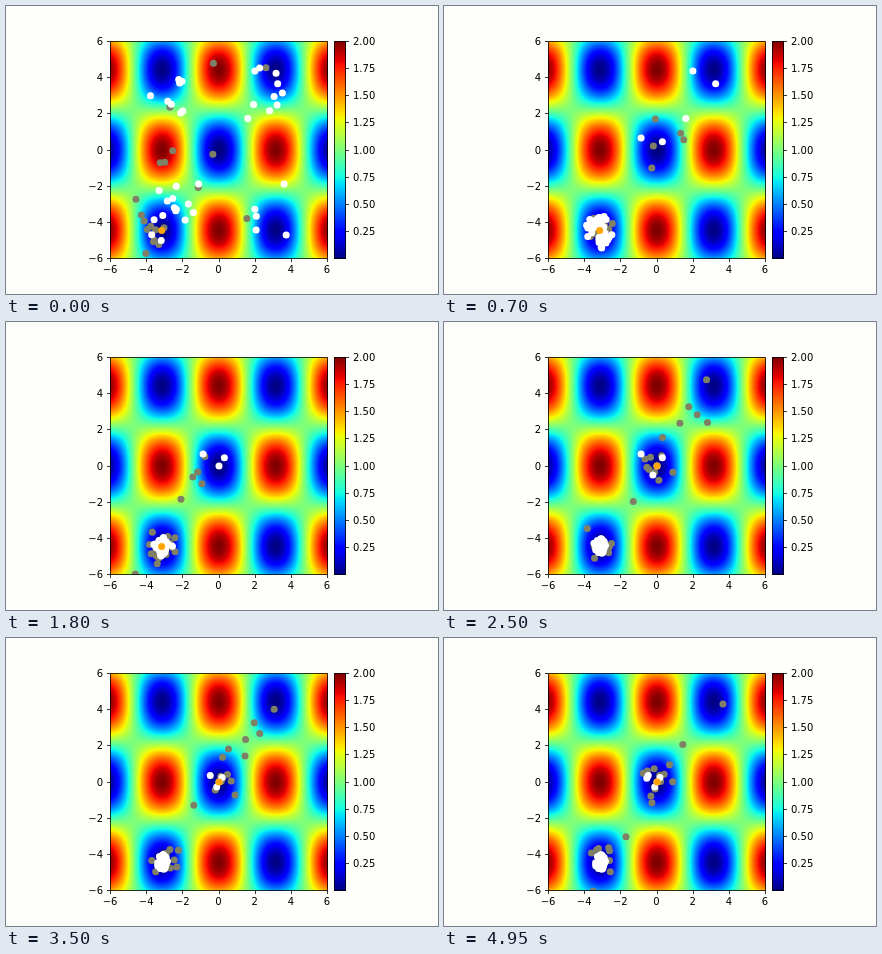
An HTML page with a canvas that plays this animation: 432 by 288 pixels, repeating every 5 s.

```html
<!DOCTYPE html>
<html lang="en">
<head>
<meta charset="utf-8">
<title>Swarm search</title>
<style>
html, body { margin: 0; width: 100%; height: 100%; overflow: hidden; background: #fefefb; }
canvas, svg { position: absolute; left: 0; top: 0; width: 432px; height: 288px; display: block; }
text { font: 10px "DejaVu Sans", sans-serif; fill: #000; }
</style>
</head>
<body>
<canvas id="heat" width="432" height="288"></canvas>
<svg id="stage" width="432" height="288" viewBox="0 0 432 288">
  <clipPath id="clip"><rect x="104.5" y="35.5" width="217" height="217"/></clipPath>
  <g id="dots" clip-path="url(#clip)"></g>
  <g id="axes"></g>
</svg>
<script>
const W = 432, H = 288, STEP = 50, COUNT = 100;
const box = { x: 104.5, y: 35.5, w: 217, h: 217 };
const bar = { x: 328.5, y: 35.5, w: 11, h: 217 };
const sx = v => box.x + (v + 6) * box.w / 12;
const sy = v => box.y + (6 - v) * box.h / 12;

// Heat map
const ramp = (v, x0, x1) => Math.min(1, Math.max(0, (v - x0) / (x1 - x0)));
function jet(v) {
  return [
    v < 0.89 ? ramp(v, 0.35, 0.66) : 1 - 0.5 * ramp(v, 0.89, 1),
    v < 0.5 ? ramp(v, 0.125, 0.375) : 1 - ramp(v, 0.64, 0.91),
    v < 0.3 ? 0.5 + 0.5 * ramp(v, 0, 0.11) : 1 - ramp(v, 0.34, 0.65)
  ].map(c => Math.round(c * 255));
}
const griewank = (x, y) =>
  1 + (x * x + y * y) / 4000 - Math.cos(x) * Math.cos(y / Math.SQRT2);
const inside = (r, x, y) => x >= r.x && x <= r.x + r.w && y >= r.y && y <= r.y + r.h;

function paintHeat() {
  const ctx = document.getElementById('heat').getContext('2d');
  const img = ctx.createImageData(W, H);
  for (let j = 0; j < H; j++) for (let i = 0; i < W; i++) {
    const px = i + 0.5, py = j + 0.5;
    let c = [254, 254, 251];
    if (inside(box, px, py)) {
      const x = (px - box.x) / box.w * 12 - 6;
      const y = 6 - (py - box.y) / box.h * 12;
      c = jet(griewank(x, y) / 2);
    } else if (inside(bar, px, py)) {
      c = jet(1 - (py - bar.y) / bar.h);
    }
    img.data.set([...c, 255], (j * W + i) * 4);
  }
  ctx.putImageData(img, 0, 0);
}

// Axes
function add(parent, tag, attrs, text) {
  const el = document.createElementNS('http://www.w3.org/2000/svg', tag);
  for (const k in attrs) el.setAttribute(k, attrs[k]);
  if (text) el.textContent = text;
  parent.appendChild(el);
  return el;
}
function drawAxes() {
  const g = document.getElementById('axes');
  const snap = v => Math.floor(v) + 0.5;
  const line = d => add(g, 'path', { d, fill: 'none', stroke: '#000', 'stroke-width': 0.8 });
  const label = (x, y, anchor, s) =>
    add(g, 'text', { x, y: Math.round(y), 'text-anchor': anchor }, s);
  for (const r of [box, bar]) line(`M${r.x} ${r.y}h${r.w}v${r.h}h${-r.w}z`);
  for (let v = -6; v <= 6; v += 2) {
    const s = String(v).replace('-', '\u2212');
    line(`M${snap(sx(v))} ${box.y + box.h}v3.5M${box.x} ${snap(sy(v))}h-3.5`);
    label(sx(v) - 0.5, 267, 'middle', s);
    label(97, sy(v) + 3.5, 'end', s);
  }
  for (let v = 0.25; v <= 2; v += 0.25) {
    const y = bar.y + bar.h * (1 - v / 2);
    line(`M${bar.x + bar.w} ${snap(y)}h3.5`);
    label(347, y + 3.5, 'start', v.toFixed(2));
  }
}

// Seeded random number in 0..1
function rand(a, b, c) {
  let h = Math.imul(a + 1, 374761393) ^ Math.imul(b + 7, 668265263) ^ Math.imul(c + 3, 974711);
  h = Math.imul(h ^ (h >>> 13), 1274126177);
  h = Math.imul(h ^ (h >>> 16), 2246822519);
  return ((h ^ (h >>> 15)) >>> 0) / 4294967296;
}

// Bees: the first few end in the central basin, the rest in the lower left one
const BEES = 38, TEAM = 5, SCOUTS = 24, SWITCH = 42;
const corner = [-3.17, -4.45];

// Start in one of the four outer basins, drawn towards the middle
function home(i) {
  const u = rand(i, 1, 1), team = i < TEAM;
  const right = team ? i > 1 : rand(i, 2, 1) < 0.36;
  const up = team ? i > 1 : rand(i, 3, 1) < 0.45;
  const x = (right ? 3.14 : -3.14) * (1 - 0.3 * u);
  const y = (up ? 4.44 : -4.44) * (1 - 0.55 * u);
  return [x + rand(i, 4, 1) * 2.4 - 1.2, y + rand(i, 5, 1) * 2 - 1];
}

// Gather in hops that tighten around the corner minimum
function gather(i, age) {
  const hop = Math.min(4, Math.floor(age / (5 + 7 * rand(i, 6, 1))));
  const a = rand(i, 7, hop) * Math.PI * 2;
  const r = Math.sqrt(rand(i, 8, hop)) * 0.82 ** hop;
  return [corner[0] + 0.8 * r * Math.cos(a), corner[1] + 1.05 * r * Math.sin(a)];
}

// Sit around the central minimum, closer as time goes on
function central(i, n) {
  const a = 2.5 - 1.5 * i;
  const r = Math.abs(1.1 - 0.55 * i) * 0.55 ** Math.floor(n / 55);
  return [r * Math.cos(a), r * Math.sin(a)];
}

function bee(i, n) {
  if (i < TEAM && n >= 6 + 4.5 * i * i) return central(i, n);
  const join = i < TEAM ? 20 : 1 + rand(i, 9, 1) * 11;
  return n < join ? home(i) : gather(i, n - join);
}

// Scouts try points on the line through two known places
function scout(n, j, bees, best) {
  const pick = u => bees[Math.floor(u * u * bees.length)];
  const a = rand(n, j, 1) < 0.6 ? best : pick(rand(n, j, 2));
  const b = pick(rand(n, j, 3));
  const phi = rand(n, j, 4) * 2 - 1;
  return [0, 1].map(k =>
    a[k] + phi * (a[k] - b[k]) + (rand(n, j, 5 + k) + rand(n, j, 8 + k) - 1) * 0.9);
}

const layer = document.getElementById('dots');
const dots = Array.from({ length: SCOUTS + BEES + 1 }, (_, i) => add(layer, 'circle', {
  r: 3.5, fill: i < SCOUTS ? '#808066' : i < SCOUTS + BEES ? '#fff' : '#ffa500'
}));

function render(n) {
  const bees = Array.from({ length: BEES }, (_, i) => bee(i, n));
  const best = n < SWITCH ? corner : [0, 0];
  const scouts = Array.from({ length: SCOUTS }, (_, j) => scout(n, j, bees, best));
  [...scouts, ...bees, best].forEach(([x, y], i) => {
    dots[i].setAttribute('cx', sx(x));
    dots[i].setAttribute('cy', sy(y));
  });
}

let shown = 0, began = null;
function tick(now) {
  if (began === null) began = now;
  const n = Math.floor((now - began) / STEP) % COUNT;
  if (n !== shown) render(shown = n);
  requestAnimationFrame(tick);
}
paintHeat();
drawAxes();
render(0);
requestAnimationFrame(tick);
</script>
</body>
</html>
```
